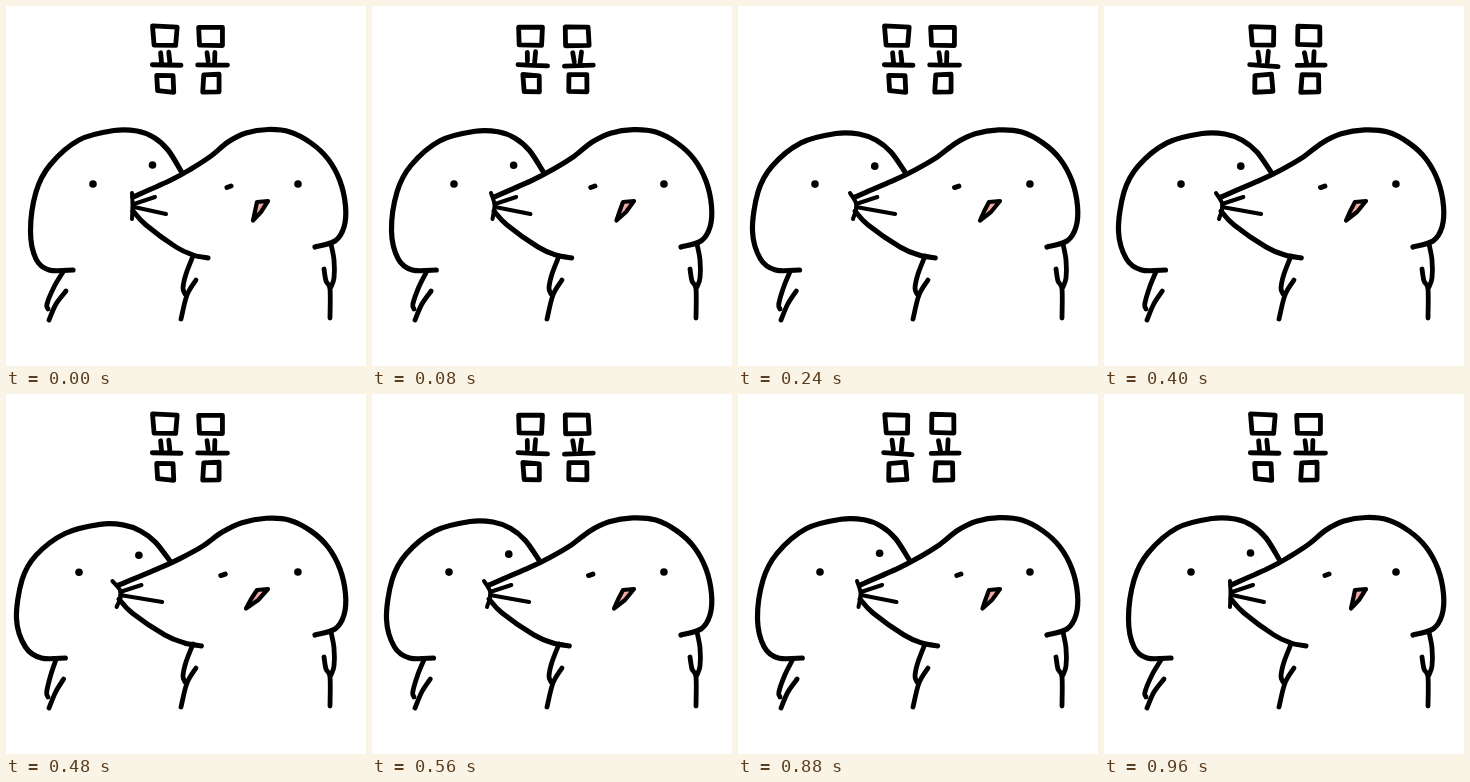
An HTML page for the animation above (1.04 s loop, 360x360 px).

```html
<!DOCTYPE html>
<html lang="ko">
<head>
<meta charset="utf-8">
<title>묨묨</title>
<style>
  html, body { margin: 0; width: 100%; height: 100%; overflow: hidden; background: #fff; }
  svg { display: block; width: 100%; height: 100%; }
  path { fill: none; stroke: #000; stroke-linecap: round; stroke-linejoin: round; }
</style>
</head>
<body>
<svg id="stage" viewBox="0 0 360 360" role="img" aria-label="묨묨"></svg>
<script>
const STEP = 80, STEPS = 13;
const stage = document.getElementById('stage');

// 0 relaxed, 1 pressed: lean in, pump back and forth, lean out
function pressAt(step) {
  const edge = Math.min(step, STEPS - 1 - step);
  return edge < 2 ? edge / 2 : step % 2 ? 1 : 1.4;
}

function smooth(a, b, v) {
  const t = Math.min(1, Math.max(0, (v - a) / (b - a)));
  return t * t * (3 - 2 * t);
}

// The push shifts everything near the snout left; feet and the far side stay put
function warp([x, y], k) {
  const near = 1 - smooth(130, 300, x);
  const aboveFeet = 1 - smooth(228, 305, y);
  const top = 1 - smooth(125, 185, y);
  return [x - 10 * k * near * aboveFeet, y + 3 * k * k * near * top];
}

// Smooth curve through all points
function curve(pts) {
  let d = `M${pts[0]}`;
  for (let i = 0; i < pts.length - 1; i++) {
    const b = pts[i], c = pts[i + 1], a = pts[i - 1] || b, e = pts[i + 2] || c;
    const c1 = b.map((v, n) => v + (c[n] - a[n]) / 6);
    const c2 = c.map((v, n) => v - (e[n] - b[n]) / 6);
    d += `C${c1} ${c2} ${c}`;
  }
  return d;
}

const polygon = pts => `M${pts.join('L')}Z`;
const points = s => s.split(' ').map(p => p.split(',').map(Number));

const parts = [];
function add(width, shape, fill) {
  const el = document.createElementNS('http://www.w3.org/2000/svg', 'path');
  el.style.strokeWidth = width;
  if (fill) el.style.fill = fill;
  stage.appendChild(el);
  parts.push({ el, shape });
}

function soft(width, text) {
  const pts = points(text);
  add(width, k => curve(pts.map(p => warp(p, k))));
}

function still(width, text) {
  const d = curve(points(text));
  add(width, () => d);
}

function eye(x, y) {
  add(7.6, k => { const p = warp([x, y], k); return `M${p}L${p}`; });
}

// Bodies
soft(5.2, '175,165 162,144 148,131.5 131,125 108,124.5 73,134 44,159 30,186 24.5,225 30,253 43,264 67,264');
soft(5.2, '127,191 165,174 185,163 205,150 222,136 240,127 262,123.5 284,126 305,137 322,153 334,175 339.5,200 338,221 329,235 309,241');
soft(5, '127,205 140,219 170,241 187,249 202,252');

// Puckered lips and whisker lines
add(4, k => curve([[126 - 4 * k, 187], [126.5 + 2 * k, 199], [126 - k, 213]].map(p => warp(p, k))));
soft(4, '128,198 149,191');
add(4, k => curve([[128, 201], [160 + 6 * k, 208]].map(p => warp(p, k))));

// Faces
eye(87, 178);
eye(146.5, 159);
eye(292, 178);
soft(5, '221,181.5 225,180');
add(4.2, k => polygon([[251, 196], [262, 195], [255 - 2 * k, 206], [247 - 5 * k, 214.5], [249 - 3 * k, 205.5]]), '#f3aaa6');

// Arms
soft(4.8, '57,266 48,281 41,298 42,303');
soft(4.8, '60,285 50,298 43,314');
still(4.8, '187,250 180,268 177,282 179,288');
still(4.8, '190,274 181,289 175,313');
still(4.8, '325,238 328,254 328,272 325,281');
still(4.8, '318,263 320,275 324,283 324,312');

// Hand-lettered 묨묨: strokes with a seeded wobble
function lettering(seed) {
  let state = seed * 7919 + 17;
  const wobble = v => {
    state = state * 16807 % 2147483647;
    return v + (state / 2147483647 - 0.5) * 2;
  };
  const shake = pts => pts.map(p => p.map(wobble));
  const box = (x, y, w, h) => polygon(shake([[x, y], [x + w, y], [x + w, y + h], [x, y + h]]));
  const line = (...pts) => curve(shake(pts));
  return [147.5, 193.5].map(x =>
    box(x, 20.5, 23, 18.5) +
    line([x + 7, 46], [x + 8, 56]) +
    line([x + 16, 46], [x + 15.5, 57]) +
    line([x - 1, 59.5], [x + 27.5, 60]) +
    box(x + 4, 69, 16.5, 16.5)).join('');
}

const words = [0, 1, 2].map(lettering);
add(4.8, (k, step) => words[step % words.length]);

let shown = -1;
function draw(time) {
  const step = Math.floor(time / STEP) % STEPS;
  if (step === shown) return;
  shown = step;
  const k = pressAt(step);
  for (const { el, shape } of parts) el.setAttribute('d', shape(k, step));
}

const start = performance.now();
function tick() {
  draw(performance.now() - start);
  requestAnimationFrame(tick);
}
tick();
</script>
</body>
</html>
```
